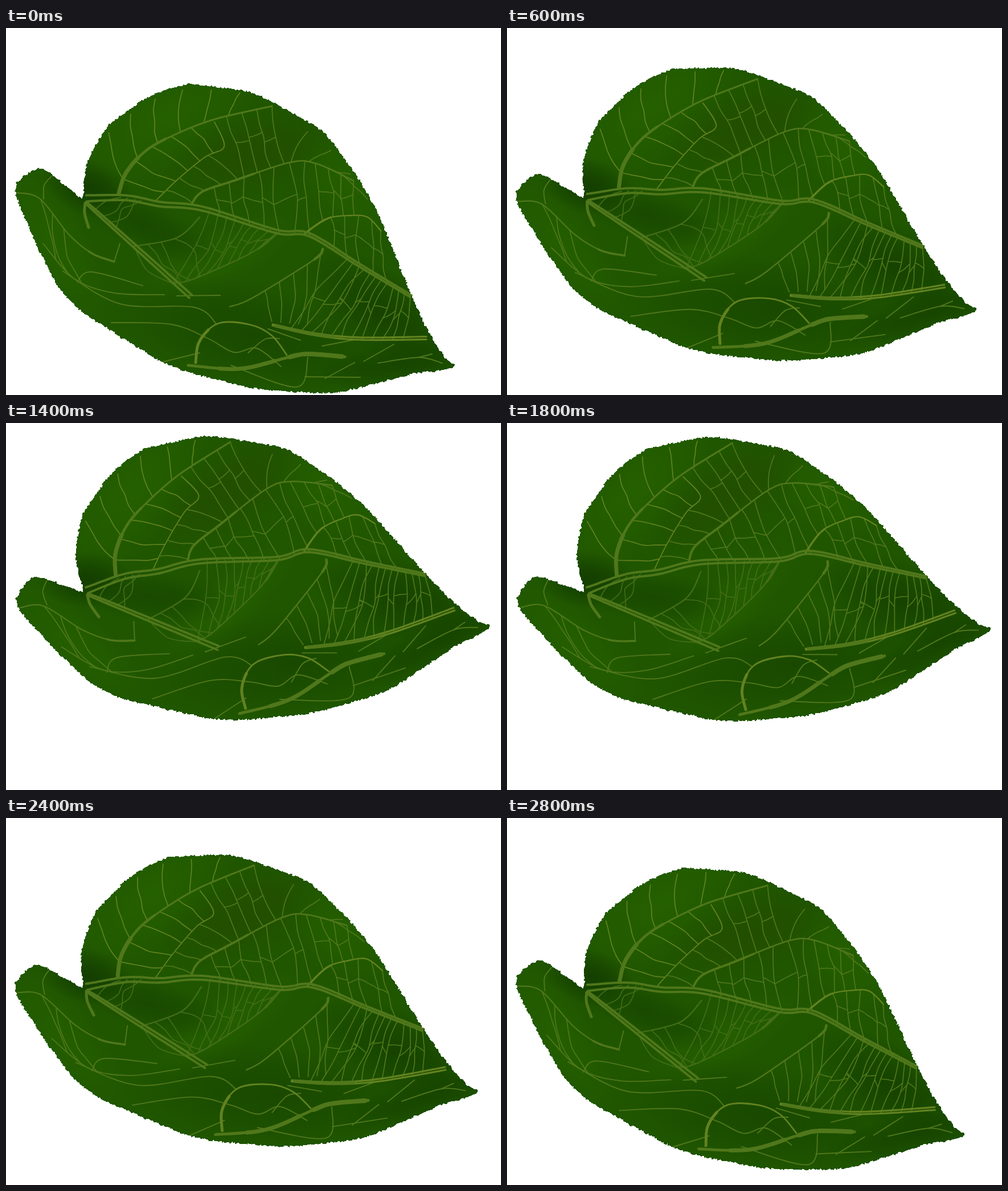
These frames come from a looping animation (869 by 644 pixels, 3000 ms). An HTML page:

```html
<!DOCTYPE html>
<html lang="en">
<head>
<meta charset="utf-8">
<title>Leaf</title>
<style>
  html, body { margin: 0; width: 100%; height: 100%; overflow: hidden; background: #fff; }
  svg { display: block; width: 100%; height: 100%; }
</style>
</head>
<body>
<svg viewBox="0 0 869 644">
  <defs id="defs"><clipPath id="blade"><path id="edge"/></clipPath></defs>
  <g id="leaf">
    <path id="body" fill="#205600" shape-rendering="crispEdges"/>
    <g clip-path="url(#blade)">
      <g id="shades"></g>
      <g id="veins" fill="none" stroke-linecap="round" stroke-linejoin="round"></g>
    </g>
  </g>
</svg>
<script>
const $ = id => document.getElementById(id);
const NS = 'http://www.w3.org/2000/svg';
const pale = '#628220', mid = '#50771b', dim = '#436d17';

let seed = 77;
const rnd = () => (seed = (seed * 16807) % 2147483647) / 2147483647;
const jitter = size => (rnd() - .5) * 2 * size;
const mix = (a, b, t) => a + (b - a) * t;

function add(parent, tag, attrs) {
  const el = document.createElementNS(NS, tag);
  for (const k in attrs) el.setAttribute(k, attrs[k]);
  return parent.appendChild(el);
}

// Smooth curve through points, readable at any share t of its length
function curve(p) {
  let d = 'M' + p[0];
  for (let i = 0; i < p.length - 1; i++) {
    const a = p[i - 1] || p[i], b = p[i], c = p[i + 1], e = p[i + 2] || c;
    const h = [0, 1].map(k => b[k] + (c[k] - a[k]) / 6);
    const g = [0, 1].map(k => c[k] - (e[k] - b[k]) / 6);
    d += `C${h} ${g} ${c}`;
  }
  const path = document.createElementNS(NS, 'path');
  path.setAttribute('d', d);
  const len = path.getTotalLength();
  const at = t => {
    const q = path.getPointAtLength(t * len);
    return [q.x, q.y];
  };
  return { d, len, at };
}

const through = text => curve(text.trim().split(/\s+/).map(s => s.split(',').map(Number)));

// Part of a curve, moved sideways by side(t)
function part(c, from, to, side = () => 0) {
  const n = Math.ceil(c.len * Math.abs(to - from) / 14) + 1, pts = [];
  for (let i = 0; i <= n; i++) {
    const t = mix(from, to, i / n);
    const [x, y] = c.at(t), a = c.at(Math.max(0, t - .01)), b = c.at(Math.min(1, t + .01));
    const l = Math.hypot(b[0] - a[0], b[1] - a[1]), s = side(t);
    pts.push([x - (b[1] - a[1]) / l * s, y + (b[0] - a[0]) / l * s]);
  }
  return curve(pts);
}

function draw(c, width, color) {
  add($('veins'), 'path', { d: c.d, stroke: color, 'stroke-width': width });
  return c;
}

// Two strokes side by side that close up from gap0 to gap1
function strands(c, width, color, gap0, gap1) {
  for (const s of [-.5, .5]) draw(part(c, 0, 1, t => s * mix(gap0, gap1, Math.sqrt(t))), width, color);
}

// Wavering line between two points
function waver([x0, y0], [x1, y1], bend = .05) {
  const pts = [], dx = x1 - x0, dy = y1 - y0, bow = jitter(bend);
  for (let i = 0; i <= 4; i++) {
    const t = i / 4, s = Math.sin(Math.PI * t) * (bow + jitter(bend / 3));
    pts.push([x0 + dx * t - dy * s, y0 + dy * t + dx * s]);
  }
  return curve(pts);
}

// Fine veins from one curve to another, some joined by zigzag links
function rungs(a, a0, a1, b, b0, b1, n, { color = mid, reach = 1, links = false, bend = .08 } = {}) {
  let last;
  for (let i = 0; i < n; i++) {
    const t = i / (n - 1), p = a.at(mix(a0, a1, t)), q = b.at(mix(b0, b1, t));
    const rung = draw(waver(p, [mix(p[0], q[0], reach), mix(p[1], q[1], reach)], bend), 1.7, color);
    if (links && last) draw(waver(last.at(.5 + jitter(.12)), rung.at(.5 + jitter(.12))), 1.6, color);
    last = rung;
  }
}

const rim = through(`135,301 142,240 157,206 181,171 213,146 250,121 300,103 330,99 380,105 440,117
  520,159 560,186 610,252 655,330 697,433 735,520 768,575 788,593 765,601 715,607 610,634 570,640
  520,639 440,633 370,617 318,603 273,585 218,553 178,527 127,493 91,452 67,407 47,365 17,290
  28,263 62,247 100,273 135,301`);

function ragged(c) {
  const pts = [];
  for (let s = 0; s < c.len; s += 2.4)
    pts.push(c.at(s / c.len).map(v => (v + jitter(1.7)).toFixed(1)).join());
  return 'M' + pts.join('L') + 'Z';
}
const outline = ragged(rim);
for (const id of ['edge', 'body']) $(id).setAttribute('d', outline);

let shadeCount = 0;
function shade(x, y, rx, ry, turn, color, alpha) {
  const id = 'shade' + shadeCount++;
  const grad = add($('defs'), 'radialGradient', { id });
  [[0, alpha], [.5, alpha * .6], [1, 0]].forEach(([offset, o]) =>
    add(grad, 'stop', { offset, 'stop-color': color, 'stop-opacity': o }));
  add($('shades'), 'ellipse', { cx: x, cy: y, rx, ry, fill: `url(#${id})`,
    transform: `rotate(${turn} ${x} ${y})` });
}
const lit = '#266200', dark = '#123c00', olive = '#224c00';
shade(275, 160, 190, 90, -30, lit, .8);
shade(600, 270, 110, 75, 55, lit, .7);
shade(430, 220, 160, 75, -15, olive, .8);
shade(370, 405, 160, 50, -25, lit, .7);
shade(85, 380, 160, 60, 60, lit, .7);
shade(145, 280, 85, 50, 20, dark, .9);
shade(240, 345, 160, 45, 25, dark, .5);
shade(660, 500, 170, 75, 35, dark, .75);
shade(440, 540, 260, 95, 12, dark, .5);
shade(690, 590, 150, 40, -8, dark, .6);

// Leading veins
const midrib = through('141,299 212,298 270,309 345,317 475,357 533,363 620,416 710,470');
const top1 = through('198,290 212,252 250,212 310,181 370,159 467,137');
const top2 = through('327,307 345,287 400,268 498,236 545,238 610,268');
const top3 = through('525,360 565,334 605,329 635,332 658,356');
const left = through('141,307 215,373 324,471');
const base = through('468,521 540,537 620,545 738,544');
const keel = through('320,592 410,598 495,578 530,572 595,577');
const arch = through('333,587 340,549 374,518 430,521 467,540 493,574');
const right = through('556,388 540,407 432,474 393,489');
const inner = through('476,360 430,395 325,442 290,447');
const bract = through('340,332 300,368 225,383');
const lobe = through('20,289 60,300 110,362 150,395 190,410');
const skin = through('65,378 120,440 190,465 278,468');
const web = through('264,302 301,266 350,226 383,208 366,165');

// Fine network
draw(web, 1.8, pale);
rungs(top1, .08, .76, rim, .064, .185, 6, { color: pale, reach: .9 });
rungs(top1, .08, .55, web, .1, .65, 5, { color: pale });
rungs(web, .12, .6, top2, 0, .3, 4);
rungs(top1, .75, 1, top2, .34, .58, 4, { links: true });
rungs(top2, .62, .93, rim, .25, .335, 4, { reach: .8 });
rungs(top2, .16, .7, midrib, .39, .66, 7, { links: true });
rungs(top2, .76, 1, top3, .25, .62, 4, { links: true });
rungs(top3, .35, 1, midrib, .74, .92, 5, { links: true });
rungs(midrib, .36, .57, inner, .98, .2, 9, { color: dim, links: true });
rungs(midrib, .1, .16, left, .08, .28, 4, { color: dim, bend: .2 });
rungs(bract, .45, 1, inner, .75, 1, 4, { color: dim, bend: .2 });
rungs(right, .05, .65, base, .22, 0, 5, { reach: .9 });
rungs(midrib, .79, 1, base, .12, .85, 12, { links: true });
rungs(lobe, .2, .5, skin, .15, .4, 3);

for (const line of ['100,427 200,484 330,490 370,520', '185,517 290,520 355,545 400,569 440,562 483,594',
  '125,446 150,428 240,452', '80,260 67,276 66,300', '395,592 510,630 530,578', '425,570 455,546 480,545',
  '525,612 622,613', '560,615 612,587', '628,585 681,555', '460,528 517,548', '555,558 612,547',
  '653,588 725,578 766,588', '725,578 748,572', '275,586 340,570', '300,470 376,469', '190,410 200,378'])
  draw(through(line), 1.9, mid);

// Laterals, heavier at the root
function lateral(c, color, width, ...roots) {
  draw(c, width, color);
  roots.forEach(([from, to, w]) => draw(part(c, from, to), w, color));
}
draw(skin, 1.8, mid);
draw(bract, 2.4, dim);
lateral(lobe, mid, 2.2, [.78, 1, 3.6]);
lateral(inner, dim, 2.4, [0, .2, 4]);
lateral(right, mid, 2.4, [0, .12, 4.5]);
lateral(top1, mid, 3, [0, .22, 7], [.22, .4, 4.5]);
lateral(top2, mid, 2.6, [0, .4, 4]);
lateral(top3, pale, 2.4, [0, .35, 3.4]);
lateral(arch, pale, 2.8, [0, .28, 5]);
lateral(keel, mid, 5, [.2, .55, 7], [.65, .98, 8]);
lateral(through('139,307 138,325 145,350'), mid, 5);
strands(midrib, 4, mid, 11, 4);
strands(left, 4, mid, 3, 7);
strands(base, 3.2, pale, 2, 5);
draw(part(base, .02, .4), 6, mid);

// Rises evenly over eight steps, falls over seven
const STEP = 200, UP = 8, DOWN = 7;

function pose(ms) {
  const n = Math.floor(ms / STEP) % (UP + DOWN);
  const p = n <= UP ? n / UP : (UP + DOWN - n) / DOWN;
  const turn = 22.75 * p * Math.PI / 180;
  const c = Math.cos(turn), s = Math.sin(turn), lift = s - .0114 * p;
  const x = 138, y = 300;
  const e = x + 1.7 * p - c * x - s * y;
  const f = y - 5.2 * p + lift * x - c * y;
  $('leaf').setAttribute('transform', `matrix(${c} ${-lift} ${s} ${c} ${e} ${f})`);
}

const start = performance.now();
function tick() {
  pose(performance.now() - start);
  requestAnimationFrame(tick);
}
tick();
</script>
</body>
</html>
```
